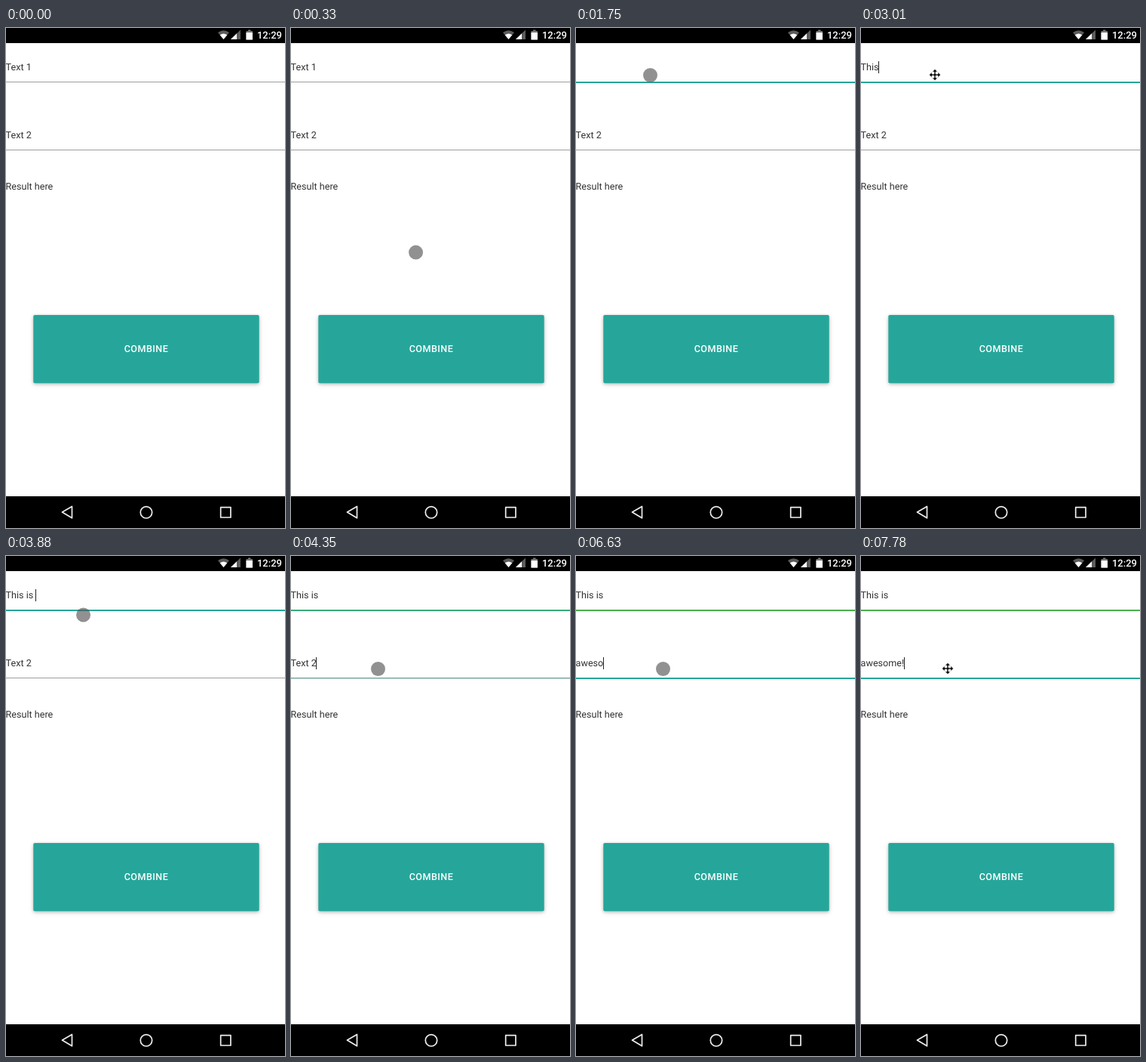
Write an HTML page that moves like this. It is 370 by 662 pixels and loops after 8 s.

```html
<!DOCTYPE html>
<html lang="en">
<head>
<meta charset="utf-8">
<title>Combine two texts</title>
<style>
  html, body { margin: 0; width: 100%; height: 100%; overflow: hidden; background: #fff; }
  svg { display: block; width: 370px; height: 662px; }
  text { font: 12.6px Roboto, "Open Sans", sans-serif; fill: #333; white-space: pre; text-rendering: geometricPrecision; }
  .button { filter: drop-shadow(0 1px 2px rgba(0,0,0,.22)) drop-shadow(0 2px 3px rgba(0,0,0,.1)); }
  .label { font-weight: 500; letter-spacing: .45px; fill: #fff; text-anchor: middle; }
  .clock { font-size: 13px; font-weight: 500; fill: #fff; text-anchor: end; }
  .nav { fill: none; stroke: #eee; stroke-width: 1.7; stroke-linejoin: round; }
</style>
</head>
<body>
<svg viewBox="0 0 370 662">
  <rect width="370" height="662" fill="#fff"/>

  <rect width="370" height="20"/>
  <path d="M281 6Q288.500 .5 296 6L288.500 15Z" fill="#5c5c5c"/>
  <path d="M283.700 9.200Q288.500 6 293.300 9.200L288.500 15Z" fill="#fff"/>
  <path d="M298 15L311 2.500V15Z" fill="#5c5c5c"/>
  <path d="M298 15L306 7.300V15Z" fill="#fff"/>
  <path d="M318.500 4H321V2.500H324.500V4H327V15.500H318.500Z" fill="#777"/>
  <path d="M318.500 6H327V15.500H318.500Z" fill="#fff"/>
  <text class="clock" x="366" y="14">12:29</text>

  <g id="fields"></g>
  <text x="-.4" y="214">Result here</text>

  <rect class="button" x="36.300" y="380" width="299.400" height="90.300" rx="1.800" fill="#26a69a"/>
  <text class="label" x="186" y="429">COMBINE</text>

  <rect y="620" width="370" height="42"/>
  <path class="nav" d="M74.500 641L87.500 633.500V648.800Z"/>
  <circle class="nav" cx="186" cy="641.300" r="7.700"/>
  <rect class="nav" x="284.700" y="634.700" width="13.300" height="13.300"/>

  <circle id="touch" r="9.500" fill="rgba(80,80,80,.63)"/>
  <path id="mover" fill="#000" stroke="#fff" stroke-width=".6"
    d="M0-7.500L3.500-4H1V-1H4V-3.500L7.500 0L4 3.500V1H1V4H3.500L0 7.500L-3.500 4H-1V1H-4V3.500L-7.500 0L-4-3.500V-1H-1V-4H-3.500Z"/>
</svg>
<script>
const LOOP = 8000, FADE = 260, BLINK = 500;
const GREY = [158, 158, 158], TEAL = [38, 166, 154], GREEN = [76, 175, 80];
const $ = id => document.getElementById(id);

function add(name, attrs) {
  const el = document.createElementNS("http://www.w3.org/2000/svg", name);
  for (const k in attrs) el.setAttribute(k, attrs[k]);
  return $("fields").appendChild(el);
}

// Each key time removes or types one character.
const fields = [
  { y: 56, label: "Text 1", typed: "This is ", focus: 680, blur: 4230,
    erase: [1010, 1150, 1310, 1450, 1610, 1750],
    type: [2560, 2770, 2920, 3010, 3150, 3250, 3350, 3720] },
  { y: 146, label: "Text 2", typed: "awesome!", focus: 4250, blur: Infinity,
    erase: [4650, 4800, 4930, 5070, 5220, 5350],
    type: [5630, 5880, 6220, 6570, 6630, 6800, 6880, 7750] }
];
for (const f of fields) {
  f.text = add("text", { x: -.4, y: f.y });
  f.line = add("rect", { y: f.y + 15, width: 370, height: 1 });
  f.under = add("rect", { y: f.y + 16, width: 370, height: 1 });
  f.caret = add("rect", { y: f.y - 12, width: 1, height: 16, fill: "#222" });
}

// time, x, y
const paths = [
  [[90, 272, 668], [160, 271, 622], [340, 160, 280], [500, 83, 118], [570, 90, 92], [650, 98.5, 62.5]],
  [[3760, 98.5, 62.5], [3880, 102.5, 77.5], [3960, 109, 118], [4050, 115.5, 149.5]]
];
// time, visible pointer
const pointers = [[0, ""], [90, "touch"], [2440, ""], [2560, "mover"], [3760, "touch"], [7520, ""], [7780, "mover"]];

const clamp = v => Math.max(0, Math.min(1, v));
const mix = (a, b, p) => a.map((v, i) => v + (b[i] - v) * p);
const rgb = c => `rgb(${c.map(Math.round)})`;

function along(path, t) {
  let i = 1;
  while (i < path.length - 1 && t > path[i][0]) i++;
  const a = path[i - 1], b = path[i];
  return mix(a, b, clamp((t - a[0]) / (b[0] - a[0]))).slice(1);
}

function drawField(f, t) {
  const past = list => list.filter(k => k <= t);
  const gone = past(f.erase).length, count = past(f.type).length;
  const value = count ? f.typed.slice(0, count) : f.label.slice(0, f.label.length - gone);
  f.text.textContent = value;

  const on = clamp((t - f.focus) / FADE), off = clamp((t - f.blur) / FADE);
  const color = rgb(mix(mix(GREY, TEAL, on), GREEN, off));
  f.line.setAttribute("fill", color);
  f.under.setAttribute("fill", color);
  f.under.setAttribute("opacity", on);

  const last = Math.max(...past([f.focus, ...f.erase, ...f.type]));
  const lit = Math.floor((t - last) / BLINK) % 2 === 0;
  const active = t >= f.focus && t < f.blur;
  f.caret.setAttribute("visibility", active && lit && value ? "visible" : "hidden");
  f.caret.setAttribute("x", Math.floor(f.text.getComputedTextLength() - .4));
}

function draw(t) {
  fields.forEach(f => drawField(f, t));
  const [x, y] = along(paths[t < 3760 ? 0 : 1], t);
  const shown = pointers.filter(p => p[0] <= t).pop()[1];
  for (const id of ["touch", "mover"]) {
    $(id).setAttribute("transform", `translate(${x - (id === "mover" ? .5 : 0)} ${y - (id === "mover" ? .5 : 0)})`);
    $(id).setAttribute("visibility", id === shown ? "visible" : "hidden");
  }
}

const start = performance.now();
function tick() {
  draw((performance.now() - start) % LOOP);
  requestAnimationFrame(tick);
}
tick();
</script>
</body>
</html>
```
